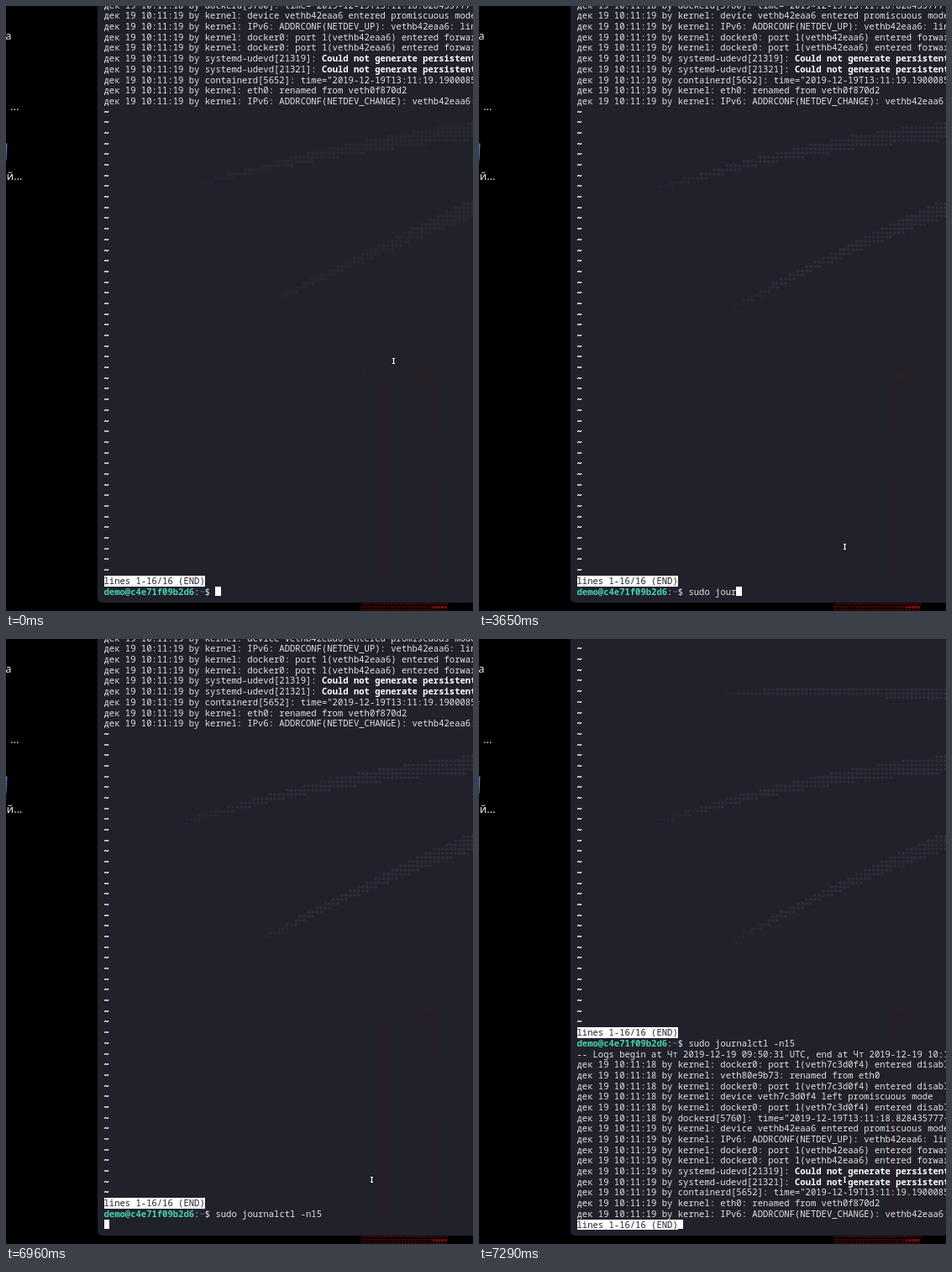
Write an HTML page with a canvas that moves like this. It is 556 px wide and 720 px high and loops after 8000 ms.

```html
<!DOCTYPE html>
<html lang="ru">
<head>
<meta charset="utf-8">
<title>Terminal</title>
<style>
html, body { margin: 0; width: 100%; height: 100%; overflow: hidden; background: #000; }
#stage { position: relative; width: 556px; height: 720px; overflow: hidden; }
#window { position: absolute; left: 109px; top: -10px; width: 460px; height: 720px;
  background: #21212b; border-radius: 0 0 0 5px; }
canvas, svg { position: absolute; left: 0; top: 0; }
pre { position: absolute; left: 116.5px; bottom: 16.8px; margin: 0; color: #e2e2e5;
  font: 10.56px/12.69px "Noto Sans Mono", "DejaVu Sans Mono", monospace; font-variant-ligatures: none; }
pre b { color: #fff; }
pre .user { color: #45d6ae; }
pre .dir { color: #3b73c8; }
pre .tilde { -webkit-text-stroke: .4px #fff; }
pre i { display: inline-block; height: 12.69px; font-style: normal; background: #fff; color: #21212b; }
pre .cursor { height: 11.5px; vertical-align: top; margin-top: .3px; }
svg text { font: 13px "Noto Sans", "Open Sans", sans-serif; fill: #e8e8e8; text-anchor: end; }
</style>
</head>
<body>
<div id="stage">
  <div id="window"></div>
  <canvas id="wall" width="556" height="720"></canvas>
  <pre id="term"></pre>
  <svg width="556" height="720">
    <text x="6.5" y="39.500">а</text>
    <text x="15.500" y="123.500">…</text>
    <text x="19.500" y="206.500">й…</text>
    <path d="M0 163.500h1.500l-1 20.500h-.5z" fill="#4a7ccc"/>
    <path id="mouse" d="M-1.500-3h3M0-3v6M-1.500 3h3" fill="none" stroke="#fff" stroke-width="1.2"/>
  </svg>
</div>
<script>
const LOOP = 8000, SHARP = 1160, ENTER = 6960, OUTPUT = 7130;
const $ = id => document.getElementById(id);
const command = 'sudo journalctl -n15';
// Time of each key press; the last two share one update.
const keys = [1740, 1820, 1910, 2400, 2490, 3070, 3400, 3480, 3650, 3810,
  3980, 4060, 4640, 4970, 5140, 5720, 5800, 6220, 6460, 6460];
const mousePath = [[0, 461.5, 422.5], [80, 432, 500], [160, 352, 630], [250, 306, 693], [500, 390, 662], [580, 435.5, 643.5]];

const at = (sec, text) => `дек 19 10:11:${sec} by ${text}`;
const port = (veth, state) => `kernel: docker0: port 1(${veth}) entered ${state} state`;
const udev = pid => at(19, `systemd-udevd[${pid}]: <b>Could not generate persistent MAC address</b>`);
const oldVeth = 'veth7c3d0f4', newVeth = 'vethb42eaa6';
const disabled = at(18, port(oldVeth, 'disabled')), forwarding = at(19, port(newVeth, 'forwarding'));
const log = [
  '-- Logs begin at Чт 2019-12-19 09:50:31 UTC, end at Чт 2019-12-19 10:11:19 UTC. --',
  disabled,
  at(18, 'kernel: veth80e9b73: renamed from eth0'),
  disabled,
  at(18, `kernel: device ${oldVeth} left promiscuous mode`),
  disabled,
  at(18, 'dockerd[5760]: time="2019-12-19T13:11:18.828435777+03:00"'),
  at(19, `kernel: device ${newVeth} entered promiscuous mode`),
  at(19, `kernel: IPv6: ADDRCONF(NETDEV_UP): ${newVeth}: link is not ready`),
  forwarding,
  forwarding,
  udev(21319),
  udev(21321),
  at(19, 'containerd[5652]: time="2019-12-19T13:11:19.190008514+03:00"'),
  at(19, 'kernel: eth0: renamed from veth0f870d2'),
  at(19, `kernel: IPv6: ADDRCONF(NETDEV_CHANGE): ${newVeth}: link becomes ready`)
];
const status = '<i>lines 1-16/16 (END)</i>';
const cursor = '<i class="cursor"> </i>';
const prompt = '<b class="user">demo@c4e71f09b2d6</b>:<b class="dir">~</b>$ ';
const page = [...log, ...Array(44).fill('<b class="tilde">~</b>'), status];

function screen(t) {
  const line = prompt + command.slice(0, keys.filter(k => k <= t).length);
  if (t < ENTER) return [...page, line + cursor];
  if (t < OUTPUT) return [...page, line, cursor];
  return [...page, line, ...log, status + cursor];
}

const g = $('wall').getContext('2d');

function dot(x, y, rx, ry) {
  g.beginPath();
  g.ellipse(x, y, rx, ry, 0, 0, 7);
  g.fill();
}

// Dotted band along a parabola from x0 to the right edge, thickening to the right.
function arc(x0, y0, yMid, y1, thick) {
  for (let x = x0; x < 560; x += 5) {
    const u = (x - x0) / (556 - x0);
    const mid = y0 * (1 - u) * (1 - 2 * u) + 4 * yMid * u * (1 - u) + y1 * u * (2 * u - 1);
    const half = 2.5 + (thick / 2 - 2.5) * u;
    g.fillStyle = `rgba(110,110,130,${Math.min(.17, .06 + u * .5)})`;
    for (let y = Math.ceil((mid - half) / 5) * 5; y <= mid + half; y += 5) dot(x, y, 2, 1.7);
  }
}

function drawWall(sharp, topArc) {
  g.clearRect(0, 0, 556, 720);
  g.filter = sharp ? 'none' : 'blur(1px)';
  const inset = sharp ? 0 : 20;
  arc(210 + inset, 219 - inset / 3, 174, 149, 21);
  arc(305 + inset / 2, 358 - inset / 4, 294, 241, 22);
  if (topArc) arc(295, 64, 63, 64, 17);

  g.fillStyle = 'rgba(110,25,40,.045)';
  for (const [x, y, w, h] of [[424, 430, 132, 15], [441, 445, 14, 245],
    [492, 437, 20, 75], [486, 565, 30, 125]]) g.fillRect(x, y, w, h);

  g.filter = 'none';
  g.fillStyle = '#50090c';
  for (let x = 424; x < 526; x += 3.7)
    for (let y = 711.5; y < 720; y += 3.5) dot(x + (y > 714 ? 0 : 1.5), y, 1.3, 1.3);
  g.fillStyle = '#8c1015';
  for (let x = 509; x < 526; x += 3.5) dot(x, 715.5, 1.6, 1.3);
}

let lastHtml, lastWall;
function frame(now) {
  const t = now % LOOP;
  const html = screen(t).join('\n');
  if (html !== lastHtml) $('term').innerHTML = lastHtml = html;

  const wall = (t >= SHARP) + (t >= OUTPUT);
  if (wall !== lastWall) drawWall(wall > 0, wall > 1);
  lastWall = wall;

  const [, x, y] = mousePath.findLast(p => p[0] <= t);
  $('mouse').setAttribute('transform', `translate(${x} ${y})`);
  requestAnimationFrame(frame);
}
frame(0);
</script>
</body>
</html>
```
